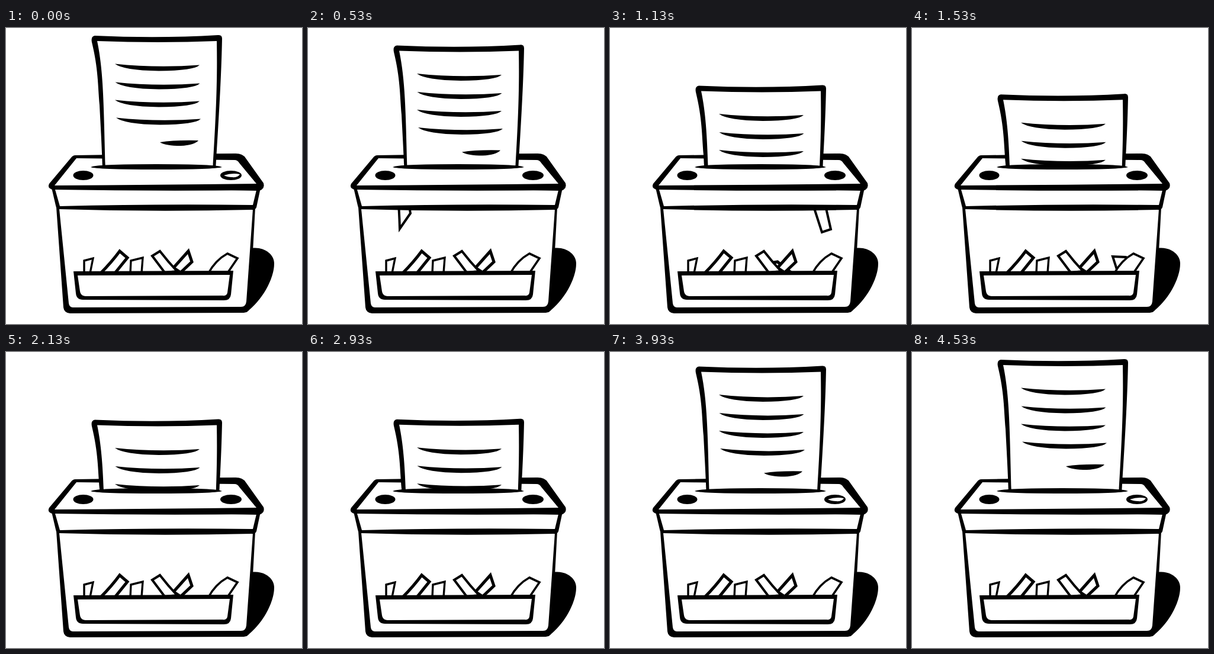
Write an HTML page that moves like this. It is 500 by 500 pixels and loops after 5.4 s.

```html
<!DOCTYPE html>
<html lang="en">
<head>
<meta charset="utf-8">
<title>Paper shredder</title>
<style>
  html, body { margin: 0; width: 100%; height: 100%; overflow: hidden; background: #fff; }
  svg { display: block; width: 100vw; height: 100vh; }
  .w { fill: #fff; }
  .strip path { fill: #fff; stroke: #000; stroke-width: 4; stroke-linejoin: miter; }
  .strip .bold { stroke-width: 5; }
</style>
</head>
<body>
<svg viewBox="0 0 500 500">
  <defs>
    <clipPath id="above"><rect width="500" height="235"/></clipPath>
    <clipPath id="window"><rect x="92" y="306" width="322" height="108"/></clipPath>
  </defs>

  <!-- shadow -->
  <path d="M410 373C432 367 453 380 453 398C453 424 432 461 406 480Z"/>

  <!-- bin -->
  <path d="M85 303H421L412 470Q411 482 400 481L108 482Q98 481 97 472Z"/>
  <path class="w" d="M90 306H417L406 462Q405 471 397 471L113 472Q107 472 106 465Z"/>

  <!-- falling strips -->
  <g clip-path="url(#window)" class="strip">
    <g id="falling">
      <path d="M151 343L169 341Q169 365 173 388L155 414Q154 380 151 343Z"/>
      <path class="bold" d="M265 323L283 320Q308 341 334 357L317 371Q286 354 265 323Z"/>
      <path d="M339 386L361 387L373 440L358 445Z"/>
    </g>
  </g>

  <!-- resting strips -->
  <g class="strip">
    <path style="stroke-width:3.4" d="M132 393L147 389L142 414H132Z"/>
    <path class="bold" d="M192 377L205 388L184 414H160Q178 396 192 377Z"/>
    <path style="stroke-width:3.4" d="M211 393L231 388L229 414H210Z"/>
    <path class="bold" d="M308 377L314 395L295 413L283 405Z"/>
    <path d="M247 385L260 377Q274 395 289 411L268 413Z"/>
    <path style="stroke-width:3.6" d="M374 381L391 389L374 414H342Q354 392 374 381Z"/>
  </g>

  <!-- tray -->
  <path d="M114 411L384 410L380 450Q379 460 368 460L130 459Q119 459 118 448Z"/>
  <path class="w" d="M121 418L378 417L374 447Q373 453 366 452L134 453Q126 452 125 445Z"/>

  <!-- band -->
  <path d="M77 270H430L423 303Q421 308 415 307Q250 311 90 306Q85 306 84 300Z"/>
  <path class="w" d="M83 273Q250 276 423 274L417 299Q250 297 91 301Z"/>

  <!-- lid -->
  <path d="M117 215Q250 213 388 212Q400 212 405 220L435 262Q438 271 428 275Q250 271 78 273Q69 270 73 263L110 219Q113 215 117 215Z"/>
  <path class="w" d="M119 220L386 223Q391 223 394 228L423 263Q250 265 82 266Z"/>
  <ellipse cx="130.5" cy="249" rx="17" ry="8"/>
  <ellipse cx="380" cy="249" rx="18" ry="8"/>
  <path id="lamp" class="w" d="M368 249Q382 244 395 247Q392 253 382 252Q374 252 368 249Z"/>

  <!-- paper -->
  <g clip-path="url(#above)">
    <g id="paper">
      <path d="M150 13Q258 18 358 12Q365 11 365 18C364 70 361 130 354 240H163C162 200 160 170 158 130C155 95 156 70 145 24Q143 14 150 13Z"/>
      <path class="w" d="M154 22Q258 26 356 22C357 80 356 130 349 240H168C165 130 165 75 154 22Z"/>
      <g id="lines"></g>
      <path d="M260 193Q285 189 325 190Q318 198 295 199Q270 199 260 193Z"/>
    </g>
  </g>
  <path d="M143 235Q152 230 254 230Q356 230 365 235Q352 239 254 239Q152 239 143 235Z"/>
</svg>
<script>
const LOOP = 5400;
const TRAVEL = 101.5;
const FALL = 25;
const $ = id => document.getElementById(id);
const paper = $('paper'), lamp = $('lamp');

$('lines').innerHTML = [[0, 0], [0.5, 31], [0, 61], [2, 91]].map(([x, y]) =>
  `<path transform="translate(${x} ${y})" d="M184 60.5Q255 68 327 62.5Q318 72 258 72.5Q198 71.5 184 60.5Z"/>`).join('');

// step at which each strip has the position it is drawn in
const strips = [...$('falling').children].map((el, i) => ({ el, at: [8, 8, 15][i] }));

const bez = (a, b, s) => 3 * (1 - s) * (1 - s) * s * a + 3 * (1 - s) * s * s * b + s * s * s;

// ease in-out with a longer tail
function ease(x) {
  if (x <= 0) return 0;
  if (x >= 1) return 1;
  let lo = 0, hi = 1;
  for (let i = 0; i < 24; i++) {
    const mid = (lo + hi) / 2;
    if (bez(0.42, 0.28, mid) < x) lo = mid; else hi = mid;
  }
  return bez(0, 1, lo);
}

// two pictures per 200 ms, held 130 and 70 ms
const stepAt = t => 2 * Math.floor(t / 200) + (t % 200 >= 130 ? 1 : 0);

function draw(t) {
  const n = stepAt(t);
  const y = TRAVEL * (ease((n - 1) / 17) - ease((n - 28) / 17));
  paper.setAttribute('transform', `translate(0 ${y.toFixed(2)})`);
  lamp.style.display = n < 3 || n >= 38 ? '' : 'none';
  for (const { el, at } of strips) {
    const d = (n - at) * FALL;
    el.setAttribute('transform', `translate(0 ${d})`);
    el.style.display = Math.abs(d) < 170 ? '' : 'none';
  }
}

const start = performance.now();
function frame() {
  draw((performance.now() - start) % LOOP);
  requestAnimationFrame(frame);
}
draw(0);
requestAnimationFrame(frame);
</script>
</body>
</html>
```
